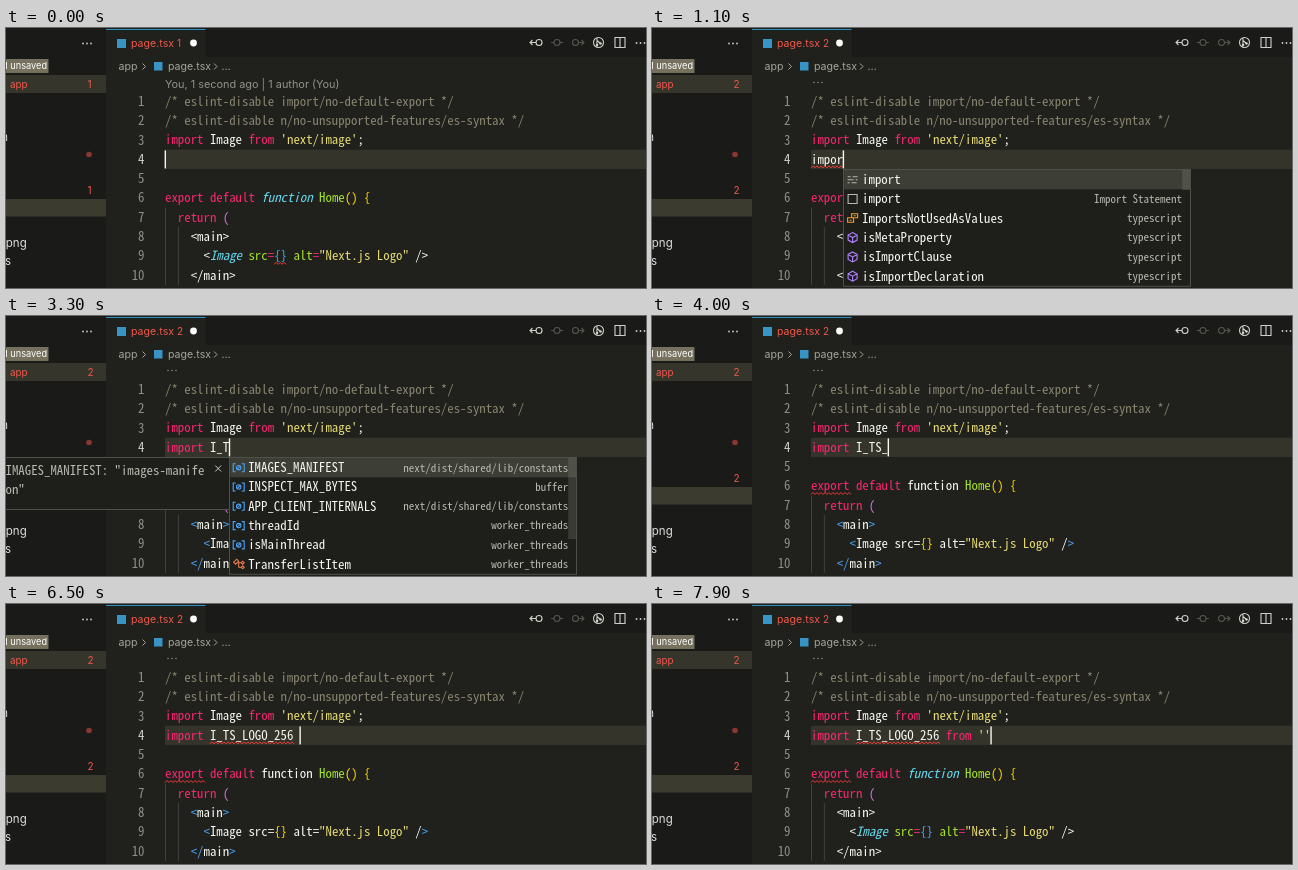
An HTML page with a canvas for the animation above (8000 ms loop, 640x260 px).

```html
<!DOCTYPE html>
<html lang="en">
<head>
<meta charset="utf-8">
<title>Editor autocomplete</title>
<style>
  html, body { margin: 0; width: 100%; height: 100%; overflow: hidden; background: #20211c; }
  canvas { display: block; width: 640px; height: 260px; }
</style>
</head>
<body>
<canvas id="stage"></canvas>
<script>
const LOOP = 8000, ROW = 19.3, CHAR = 6.42, LEFT = 159, TOP = 73.5;
const MONO = '"Noto Sans Mono CJK JP", "Noto Sans Mono CJK SC", "Noto Sans Mono", monospace';
const SANS = 'Inter, sans-serif';
const COLORS = {
  w: '#f8f8f2', p: '#f92672', c: '#66d9ef', g: '#a6e22e', y: '#e6db74', v: '#ae81ff',
  n: '#88846f', b: '#4ba3f5', o: '#ffd700', m: '#da70d6', r: '#f0584c', d: '#b9b9b0',
  e: '#ee9d28', s: '#e8794f',
};

const canvas = document.getElementById('stage');
const ctx = canvas.getContext('2d');
const dpr = window.devicePixelRatio || 1;
canvas.width = 640 * dpr;
canvas.height = 260 * dpr;

// Font size whose character advance equals the wanted width
ctx.font = `100px ${MONO}`;
const advance = ctx.measureText('0').width / 100;
const CODE_SIZE = CHAR / advance, DETAIL_SIZE = 5.5 / advance;

// [time, text typed on line 4]
const TYPING = [[0, ''], [100, 'i'], [300, 'im'], [700, 'imp'], [900, 'impo'], [1000, 'impor'],
  [1300, 'import'], [1600, 'import '], [2000, 'import I'], [2400, 'import I_'], [3000, 'import I_T'],
  [3500, 'import I_TS'], [3900, 'import I_TS_'], [4200, 'import I_TS_L'], [4400, 'import I_TS_LO'],
  [4600, 'import I_TS_LOG'], [4800, 'import I_TS_LOGO'], [5000, 'import I_TS_LOGO_'],
  [5700, 'import I_TS_LOGO_2'], [5900, 'import I_TS_LOGO_25'], [6100, 'import I_TS_LOGO_256'],
  [6400, 'import I_TS_LOGO_256 '], [6600, 'import I_TS_LOGO_256 f'], [6800, 'import I_TS_LOGO_256 fr'],
  [6900, 'import I_TS_LOGO_256 fro'], [7200, 'import I_TS_LOGO_256 from'],
  [7400, 'import I_TS_LOGO_256 from '], [7600, "import I_TS_LOGO_256 from ''"]];

// Code: each ~ starts a token, the next letter is its colour, a capital means italic
const HEAD = ['~n/* eslint-disable import/no-default-export */',
  '~n/* eslint-disable n/no-unsupported-features/es-syntax */',
  "~pimport~w Image ~pfrom~y 'next/image'~w;"];
const PARSED = ['~pexport default ~Cfunction ~gHome~o() {', '~w  ~preturn ~m(', '~w    <main>',
  '~w      <~CImage ~gsrc~p=~b{} ~galt~p=~y"Next.js Logo"~w />', '~w    </main>'];
const BROKEN = ['~pexport default ~wfunction ~gHome~o() {', '~w  ~preturn ~m(', '~b    <~wmain~b>',
  '~b      <~wImage src=~o{} ~walt=~y"Next.js Logo"~w /~b>', '~b    </~wmain~b>'];

const ICONS = {
  keyword: ['d', 'M-5-3h3M0-3h5M-5 0h6M3 0h2M-5 3h2M-1 3h5'],
  snippet: ['d', 'M-4.5-4.5h9v9h-9z'],
  enum: ['e', 'M-1-4.5h6v4h-6zM-5-.5h6v4.5h-6zM-3 2h2M1-2.5h2'],
  method: ['v', 'M0-5 4.5-2.5V2.5L0 5-4.5 2.5V-2.5zM-4.5-2.5 0 0 4.5-2.5M0 0V5'],
  variable: ['b', 'M-3-4h-2.5v8H-3M3-4h2.5v8H3M-2.2 0a2.2 2.2 0 1 0 4.4 0a2.2 2.2 0 1 0-4.4 0M-2 2 2-2'],
  class: ['s', 'M-5-2-2-5 0-3-3 0zM-1.5-1.5H2.5M2.5-1.5 4-3 5.5-1.5 4 0zM0-1.5V3H2.5M2.5 3 4 1.5 5.5 3 4 4.5z'],
  interface: ['b', 'M-3 0h3M0 0a2.4 2.4 0 1 0 4.8 0a2.4 2.4 0 1 0-4.8 0M-5.5 0a1.2 1.2 0 1 0 2.4 0a1.2 1.2 0 1 0-2.4 0'],
};

// Suggestion lists, shown from start to end
const POPUPS = [
  { start: 500, end: 1600, thumb: 20, items: [
    ['keyword', 'import', ''], ['snippet', 'import', 'Import Statement'],
    ['enum', 'ImportsNotUsedAsValues', 'typescript'], ['method', 'isMetaProperty', 'typescript'],
    ['method', 'isImportClause', 'typescript'], ['method', 'isImportDeclaration', 'typescript']] },
  { start: 2000, end: 2400, thumb: 20, items: [
    ['variable', 'Image', 'next/image'], ['variable', 'init', '../../../dist'], ['class', 'internal', 'stream'],
    ['interface', 'I18NConfig', 'next/dist/server/config-shared'],
    ['class', 'I18NProvider', 'next/dist/server/future/helpers/i18n-p⋯'],
    ['variable', 'IMAGES_MANIFEST', 'next/dist/shared/lib/constants']],
    doc: { height: 91, lines: [[14, '~dconst Image: React.ForwardR⋯'],
      [52.5, '~dt.RefAttributes<...>>'], [71.5, '~default Image']] } },
  { start: 2400, end: 4000, thumb: 81, items: [
    ['variable', 'IMAGES_MANIFEST', 'next/dist/shared/lib/constants'], ['variable', 'INSPECT_MAX_BYTES', 'buffer'],
    ['variable', 'APP_CLIENT_INTERNALS', 'next/dist/shared/lib/constants'],
    ['variable', 'threadId', 'worker_threads'], ['variable', 'isMainThread', 'worker_threads'],
    ['class', 'TransferListItem', 'worker_threads']],
    doc: { height: 53, lines: [[14, '~dIMAGES_MANIFEST: "images-manife'], [33, '~don"']] } },
  { start: 6600, end: 7400, items: [
    ['snippet', 'for', 'For Loop'], ['snippet', 'forawaitof', 'For-Await-Of Loop'],
    ['snippet', 'foreach =>', 'For-Each Loop using =>'], ['snippet', 'forin', 'For-In Loop'],
    ['snippet', 'forof', 'For-Of Loop']],
    doc: { left: 16, height: 117, scroll: 201, lines: [[14, '~dFor Loop (TypeScript Language Basics)'],
      [46, '~pfor ~w(~Clet ~windex ~p= ~v0~w; index ~p< ~warray.length;'],
      [65, '~w    ~Cconst ~welement ~p= ~warray[index];'], [104, '~w}']] } },
];

function rect(x, y, w, h, color) {
  ctx.fillStyle = color;
  ctx.fillRect(x, y, w, h);
}
function frame(x, y, w, h) {
  rect(x, y, w, h, '#1e1f1b');
  ctx.strokeStyle = '#50504a';
  ctx.lineWidth = 1;
  ctx.strokeRect(Math.round(x) + .5, y + .5, w - 1, h - 1);
}
function text(str, x, y, color, size = 10.6, font = SANS, align = 'left') {
  ctx.font = `${size}px ${font}`;
  ctx.textAlign = align;
  ctx.fillStyle = color;
  ctx.fillText(str, x, y + size * .35);
}
function code(tokens, x, y) {
  for (const token of tokens.split('~').slice(1)) {
    const key = token[0].toLowerCase(), str = token.slice(1);
    ctx.font = `${key === token[0] ? '' : 'italic '}${CODE_SIZE}px ${MONO}`;
    ctx.textAlign = 'left';
    ctx.fillStyle = COLORS[key];
    ctx.fillText(str, x, y + 4.3);
    x += str.length * CHAR;
  }
}
function path(d, x, y, color, width = 1) {
  ctx.save();
  ctx.translate(x, y);
  ctx.strokeStyle = color;
  ctx.lineWidth = width;
  ctx.stroke(new Path2D(d));
  ctx.restore();
}
function dot(x, y, r, color) {
  ctx.fillStyle = color;
  ctx.beginPath();
  ctx.arc(x, y, r, 0, Math.PI * 2);
  ctx.fill();
}
function squiggle(column, length, line) {
  const waves = Math.round(length * CHAR / 4);
  path('M0 0' + 'l2-2l2 2'.repeat(waves), LEFT + column * CHAR, rowY(line) + 8.5, '#f23a3a');
}
const rowY = line => TOP + (line - 1) * ROW;

function drawSidebar(errors) {
  rect(0, 0, 100, 260, '#1a1a18');
  for (const x of [77, 81, 85]) dot(x, 15.5, .9, '#c5c5c0');
  rect(0, 31, 42.5, 14, '#75715e');
  text('1 unsaved', -2, 38, '#fff', 9.2);
  rect(0, 47, 100, 18, '#35352c');
  text('app', 4, 56.5, COLORS.r, 9.8);
  text(errors, 81.5, 56.5, COLORS.r, 10);
  text('n', -4.5, 109, '#ddd', 11);
  dot(83, 126.5, 2.8, '#87392f');
  text(errors, 81.5, 162, COLORS.r, 10);
  rect(0, 171, 100, 17.5, '#3c3b30');
  text('.png', -3.5, 215, '#ddd', 11.5);
  text('s', -1, 233, '#ddd', 11.5);
}

function drawHeader(errors) {
  rect(100, 0, 540, 29, '#1a1a18');
  rect(100, 0, 99.5, 29, '#20211c');
  rect(100, 1, 99.5, 1, '#2f8fc0');
  rect(111, 11, 9, 9, '#3994c6');
  text('page.tsx', 125, 15.5, COLORS.r);
  text(errors, 171, 15.5, COLORS.r, 10);
  dot(187.5, 15, 3.4, '#fff');

  const ring = 'M-3 0a3 3 0 1 0 6 0a3 3 0 1 0-6 0';
  path(ring, 533, 14.5, '#d0d0ca', 1.1);
  path('M6 0H0M2.5-2.5 0 0 2.5 2.5', 524, 14.5, '#d0d0ca', 1.1);
  path(ring + 'M-6 0h3M3 0h3', 551, 14.5, '#55554e', 1.1);
  path(ring + 'M3 0h5M6-2.5 8.5 0 6 2.5', 569.5, 14.5, '#55554e', 1.1);
  path('M-5 0a5 5 0 1 0 10 0a5 5 0 1 0-10 0M-1.5-5V4M-1.5-2 2 1', 592.5, 14.5, '#d0d0ca', 1.1);
  dot(591, 17, 1.3, '#d0d0ca');
  dot(594.5, 15.5, 1.3, '#d0d0ca');
  path('M-5-5H5V5H-5zM0-5V5', 614, 14.5, '#d0d0ca', 1.1);
  for (const x of [630.5, 634.5, 638.5]) dot(x, 15, .9, '#d0d0ca');

  const grey = '#a5a59c', chevron = 'M-1.5-3 1.5 0-1.5 3';
  text('app', 112.5, 38.5, grey);
  path(chevron, 138, 38.5, grey);
  rect(148, 34, 8.5, 8.5, '#3994c6');
  text('page.tsx', 162, 38.5, grey);
  path(chevron, 209.5, 38.5, grey);
  text('…', 215.5, 38.5, grey);
}

function lineFour(typed) {
  const [, word, name, rest] = typed.match(/^(\S*)( ?\w*)(.*)$/);
  if (word !== 'import') return '~w' + typed;
  const from = rest.startsWith(' from');
  return `~pimport~w${name}` + (from ? `~p from~y${rest.slice(5)}` : `~w${rest}`);
}

function drawCode(t, typed, typedAt) {
  const broken = typed.startsWith('import') && !typed.endsWith("'");
  rect(LEFT, rowY(4) - ROW / 2, 481, ROW, '#35342b');
  if (t < 300) text('You, 1 second ago | 1 author (You)', LEFT, 56, '#92928a', 10.9);
  else for (const x of [162, 166, 170]) dot(x, 54.5, .75, '#92928a');

  for (let line = 1; line <= 10; line++) {
    text(line, 138.5, rowY(line), line === 4 ? '#d0d0c8' : '#90908a', CODE_SIZE, MONO, 'right');
  }
  rect(LEFT, rowY(7) - ROW / 2, 1, ROW * 4, '#41423a');
  rect(LEFT + 2 * CHAR, rowY(8) - ROW / 2, 1, ROW * 3, '#41423a');
  HEAD.forEach((tokens, i) => code(tokens, LEFT, rowY(i + 1)));
  code(lineFour(typed), LEFT, rowY(4));
  (broken ? BROKEN : PARSED).forEach((tokens, i) => code(tokens, LEFT, rowY(i + 6)));

  if (t < 100) squiggle(17, 2, 9);
  if (t >= 500 && t < 1300) squiggle(0, typed.length, 4);
  if (t >= 1600) squiggle(0, 6, 6);
  if (t >= 6300) squiggle(7, 13, 4);

  // The caret stays solid for half a second after each key
  if ((t - typedAt) % 1000 < 500) {
    rect(LEFT + typed.length * CHAR - .4, rowY(4) - 9, 1.4, 18, '#f8f8f0');
  }
}

function drawDoc(doc, right, y) {
  const left = doc.left ?? -20, textX = doc.left ? left + 5 : -.5;
  frame(left, y, right - left + 1, doc.height);
  ctx.save();
  ctx.beginPath();
  ctx.rect(left, y, right - left, doc.height);
  ctx.clip();
  for (const [dy, tokens] of doc.lines) code(tokens, textX, y + dy);
  path('M-3-3 3 3M3-3-3 3', right - 11, y + 11.5, '#c8c8c2');
  if (doc.scroll) rect(left + 1, y + doc.height - 9, doc.scroll, 8, '#45453e');
  ctx.restore();
}

function drawPopup({ items, doc, thumb }, typed) {
  const x = Math.min(LEFT + typed.length * CHAR, 282), y = 141, width = 348;
  if (doc) drawDoc(doc, x, y);
  frame(x, y, width, items.length * ROW + 2);
  rect(x + 1, y + 1, width - 2, ROW, '#3d3e35');
  items.forEach(([icon, label, detail], i) => {
    const rowMid = y + 10.7 + i * ROW, [color, shape] = ICONS[icon];
    path(shape, x + 9.5, rowMid, COLORS[color], 1.1);
    code('~w' + label, x + 19, rowMid);
    text(detail, x + width - 9, rowMid, COLORS.d, DETAIL_SIZE, MONO, 'right');
  });
  if (thumb) rect(x + width - 9, y + 1, 8, thumb, 'rgba(130,130,120,.28)');
}

function draw(now) {
  const t = now % LOOP;
  const [typedAt, typed] = TYPING.findLast(([time]) => time <= t);
  const errors = t < 100 ? '1' : '2';
  ctx.setTransform(dpr, 0, 0, dpr, 0, 0);
  rect(0, 0, 640, 260, '#20211c');
  drawHeader(errors);
  drawCode(t, typed, typedAt);
  drawSidebar(errors);
  const popup = POPUPS.find(({ start, end }) => t >= start && t < end);
  if (popup) drawPopup(popup, typed);
}

const startTime = performance.now();
function tick() {
  draw(performance.now() - startTime);
  requestAnimationFrame(tick);
}
tick();
</script>
</body>
</html>
```
